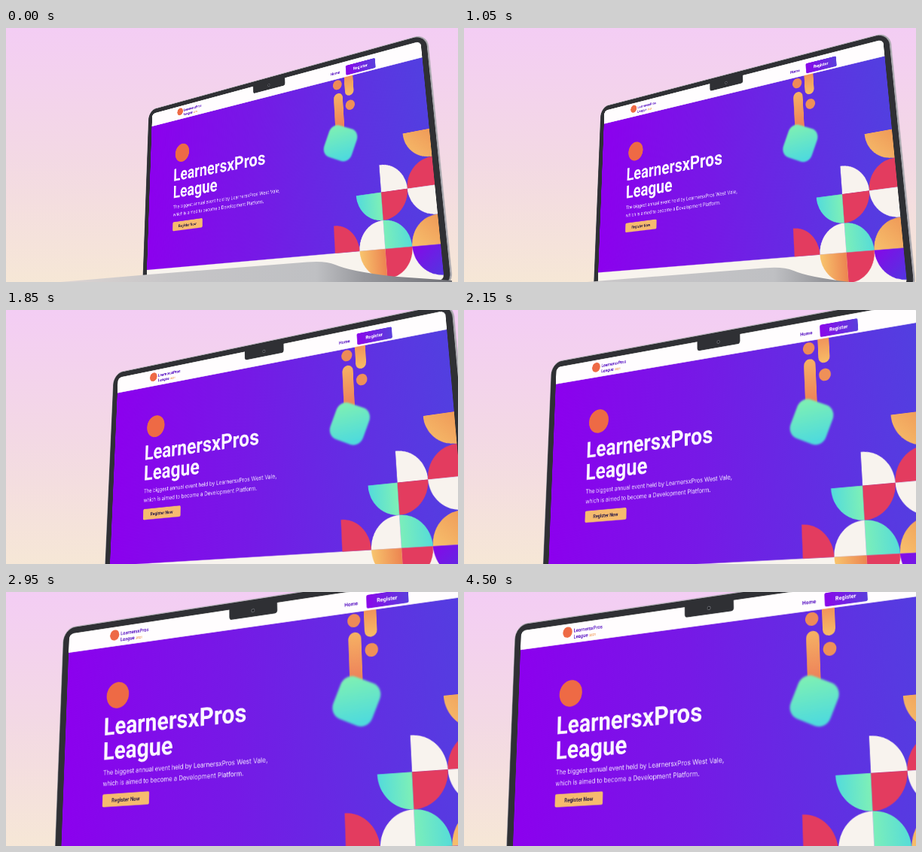
Recreate the animation shown at these times as an HTML page. Size 600 px wide and 338 px high, loop 4550 ms.

```html
<!DOCTYPE html>
<html lang="en">
<head>
<meta charset="utf-8">
<title>Laptop zoom</title>
<style>
  html, body { margin: 0; width: 100%; height: 100%; overflow: hidden; }
  body { position: relative; background: linear-gradient(#f3cdf4, #f3d9e4 52%, #f6e7d6); }
  svg { position: absolute; left: 0; top: 0; display: block; }
  #lid { transform-origin: 0 0; }
  text { font-family: Roboto, sans-serif; font-weight: 700; }
  .body { font-family: Inter, sans-serif; font-weight: 400; font-size: 15.1px; fill: #f3e9ff; }
  .title { font-size: 57.3px; fill: #fbf6ff; }
  .brand { font-size: 12px; fill: #5a16c4; }
</style>
</head>
<body>
<svg id="lid" viewBox="-40 -90 1080 740">
  <defs>
    <linearGradient id="hero"><stop offset="0" stop-color="#8c00ee"/><stop offset=".45" stop-color="#7619e6"/><stop offset="1" stop-color="#523fe0"/></linearGradient>
    <linearGradient id="cta"><stop offset="0" stop-color="#8a06ea"/><stop offset="1" stop-color="#5a3fdc"/></linearGradient>
    <linearGradient id="violet" x1="0" x2="1" y1="0" y2="1"><stop offset="0" stop-color="#8608e8"/><stop offset="1" stop-color="#5236e0"/></linearGradient>
    <linearGradient id="orange" x1="0" x2="1" y1="1" y2="0"><stop offset="0" stop-color="#f7c06c"/><stop offset="1" stop-color="#ef9a58"/></linearGradient>
    <linearGradient id="amber"><stop offset="0" stop-color="#f8c56e"/><stop offset="1" stop-color="#ec8450"/></linearGradient>
    <linearGradient id="pillA" x1="0" x2="0" y1="0" y2="1"><stop offset="0" stop-color="#f6b264"/><stop offset="1" stop-color="#ec7a58"/></linearGradient>
    <linearGradient id="pillB" x1="0" x2="0" y1="0" y2="1"><stop offset=".3" stop-color="#ef8c58"/><stop offset="1" stop-color="#f8bd66"/></linearGradient>
    <linearGradient id="teal" x1="0" x2=".6" y1="0" y2="1"><stop offset="0" stop-color="#84f2ae"/><stop offset="1" stop-color="#4fdbdc"/></linearGradient>
    <linearGradient id="mint"><stop offset="0" stop-color="#7beeba"/><stop offset="1" stop-color="#56dcd8"/></linearGradient>
    <linearGradient id="aqua"><stop offset="0" stop-color="#52dbdc"/><stop offset="1" stop-color="#7ff0b6"/></linearGradient>
    <filter id="soft" x="-20%" y="-20%" width="140%" height="140%"><feGaussianBlur stdDeviation="2.4"/></filter>
    <clipPath id="screen"><rect y="-47" width="1000" height="625" rx="14"/></clipPath>
  </defs>

  <rect x="-18.5" y="-64" width="1039" height="661" rx="36" fill="#a9a8ae"/>
  <rect x="-17" y="-62" width="1033" height="657" rx="34" fill="#2f3034"/>

  <g clip-path="url(#screen)">
    <rect y="-47" width="1000" height="625" fill="#f8f4ee"/>
    <rect width="1000" height="492" fill="url(#hero)"/>
    <g id="tiles"></g>

    <rect x="764" y="-40" width="28" height="98" rx="14" fill="url(#pillB)"/>
    <circle cx="741" cy="18" r="14.5" fill="#ee8a58"/>
    <circle cx="778" cy="86" r="14.5" fill="#ef9058"/>
    <rect x="727" y="44" width="29" height="116" rx="14.5" fill="url(#pillA)"/>
    <rect x="693" y="144" width="94" height="94" rx="26" fill="url(#teal)" filter="url(#soft)" transform="rotate(25 740 191)"/>

    <rect y="-47" width="1000" height="47" fill="#fffdfe"/>
    <circle cx="133" cy="-27" r="13" fill="#ee6a45"/>
    <text class="brand" x="150" y="-25">LearnersxPros</text>
    <text class="brand" x="150" y="-10">League</text>
    <text x="193" y="-10" font-size="8" fill="#f0954e">2021</text>
    <text x="721" y="-15" font-size="11.5" fill="#5a16c4">Home</text>
    <rect x="771" y="-34" width="93" height="29.5" rx="4" fill="url(#cta)"/>
    <text x="817" y="-15" font-size="12" fill="#fff" text-anchor="middle">Register</text>

    <circle cx="146" cy="119" r="31" fill="#ee6a45"/>
    <text class="title" x="109" y="211">LearnersxPros</text>
    <text class="title" x="109" y="268">League</text>
    <text class="body" x="111" y="303">The biggest annual event held by LearnersxPros West Vale,</text>
    <text class="body" x="111" y="328">which is aimed to become a Development Platform.</text>
    <rect x="111" y="347" width="126" height="29" rx="4" fill="#f6bb6e"/>
    <text x="174" y="366" font-size="12.6" fill="#32204a" text-anchor="middle">Register Now</text>
  </g>

  <path d="M442-56H562V-30Q562-23 555-23H449Q442-23 442-30Z" fill="#2f3034"/>
  <circle cx="502" cy="-37" r="3.6" fill="#1d1e22" stroke="#77787f" stroke-width="1.2"/>
</svg>

<svg id="front" width="600" height="338" viewBox="0 0 600 338">
  <defs>
    <linearGradient id="metal"><stop offset="0" stop-color="#ddd5d3"/><stop offset=".3" stop-color="#c6c5c7"/><stop offset=".66" stop-color="#bfc0c3"/><stop offset=".78" stop-color="#96979c"/><stop offset="1" stop-color="#6f7076"/></linearGradient>
  </defs>
  <path id="base" fill="url(#metal)" d="M61 339L120 334 190 328 400 311.5Q424 309.5 437 315Q460 325 520 331L592 336V460H61Z"/>
</svg>

<script>
const LOOP = 4550, MOVE = 4040, SCALE = 0.75;
const lid = document.getElementById('lid');
const base = document.getElementById('base');
lid.setAttribute('width', 1080 * SCALE);
lid.setAttribute('height', 740 * SCALE);

// Quarter discs: centre column, centre row, x and y direction, fill
const RED = '#e33c5f', CREAM = '#f8f3ee', CELL = 73.5;
const tiles = [
  [4, 0, -1, 1, 'url(#orange)'], [4, 2, -1, -1, RED], [2, 2, 1, -1, CREAM],
  [2, 2, -1, 1, 'url(#aqua)'], [2, 2, 1, 1, RED], [4, 2, -1, 1, CREAM],
  [0, 4, 1, -1, RED], [2, 4, -1, -1, CREAM], [2, 4, 1, -1, 'url(#mint)'],
  [4, 4, -1, -1, 'url(#orange)'], [2, 4, -1, 1, 'url(#amber)'],
  [2, 4, 1, 1, RED], [4, 4, -1, 1, 'url(#violet)']
];
document.getElementById('tiles').innerHTML = tiles.map(([c, r, dx, dy, fill]) => {
  const x = 706 + c * CELL, y = 198 + r * CELL, sweep = dx * dy > 0 ? 1 : 0;
  return `<path fill="${fill}" d="M${x} ${y}h${dx * CELL}A${CELL} ${CELL} 0 0 ${sweep} ${x} ${y + dy * CELL}Z"/>`;
}).join('');

// Corners of the purple panel and where the camera puts them at a few stops
const corners = [[0, 0], [1000, 0], [1000, 492], [0, 492]]
  .map(([x, y]) => [(x + 40) * SCALE, (y + 90) * SCALE]);
const stops = [0, 0.205, 0.59, 1];
const poses = [
  [193.5, 131, 552.5, 39, 577, 287.5, 187, 322],
  [170, 120.5, 570, 33, 595.5, 301.5, 161, 332],
  [122, 98.7, 601.1, 16.7, 625.2, 321.7, 112, 348.5],
  [75, 77, 623.1, 2.9, 645.5, 339.7, 64.2, 358.9]
];

function ease(u) {
  return u < 0.5 ? 4 * u ** 3 : 1 - 4 * (1 - u) ** 3;
}

// Smooth curve through all stops
function poseAt(p) {
  const weights = stops.map((a, i) =>
    stops.reduce((w, b, j) => i === j ? w : w * (p - b) / (a - b), 1));
  return poses[0].map((_, k) => poses.reduce((sum, q, i) => sum + q[k] * weights[i], 0));
}

function solve(m) {
  const n = m.length;
  for (let c = 0; c < n; c++) {
    let top = c;
    for (let r = c + 1; r < n; r++) if (Math.abs(m[r][c]) > Math.abs(m[top][c])) top = r;
    [m[c], m[top]] = [m[top], m[c]];
    for (let r = 0; r < n; r++) {
      if (r === c) continue;
      const f = m[r][c] / m[c][c];
      for (let k = c; k <= n; k++) m[r][k] -= f * m[c][k];
    }
  }
  return m.map((row, i) => row[n] / row[i]);
}

function perspective(q) {
  const rows = [];
  corners.forEach(([x, y], i) => {
    const u = q[2 * i], v = q[2 * i + 1];
    rows.push([x, y, 1, 0, 0, 0, -x * u, -y * u, u], [0, 0, 0, x, y, 1, -x * v, -y * v, v]);
  });
  const [a, b, c, d, e, f, g, h] = solve(rows);
  const cells = [a, d, 0, g, b, e, 0, h, 0, 0, 1, 0, c, f, 0, 1];
  return `matrix3d(${cells.map(n => n.toFixed(9)).join()})`;
}

function draw(ms) {
  const p = ease(Math.min(1, (ms % LOOP) / MOVE));
  lid.style.transform = perspective(poseAt(p));
  base.setAttribute('transform', `translate(0 ${(110 * p).toFixed(2)})`);
}

const start = performance.now();
function tick() {
  draw(performance.now() - start);
  requestAnimationFrame(tick);
}
draw(0);
requestAnimationFrame(tick);
</script>
</body>
</html>
```
